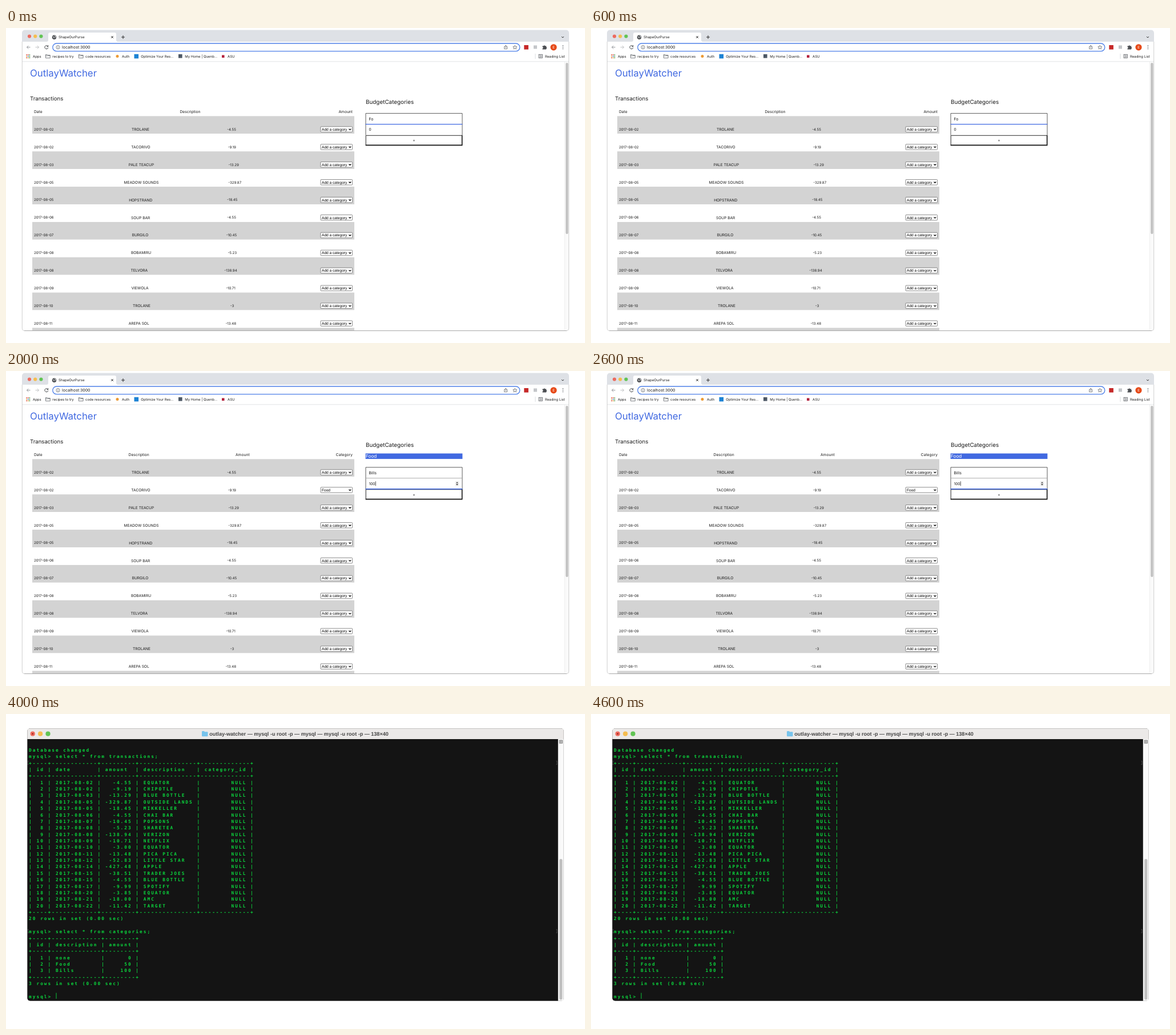
An HTML page that plays this animation: 1014 by 552 pixels, repeating every 5 s.

```html
<!DOCTYPE html>
<html lang="en">
<head>
<meta charset="utf-8">
<title>Budget demo</title>
<style>
  html, body { margin: 0; width: 100%; height: 100%; overflow: hidden; background: #fff; }
  svg { display: block; width: 1014px; height: 552px; text-rendering: geometricPrecision; }
</style>
</head>
<body>
<svg id="stage" viewBox="0 0 1014 552"></svg>
<script>
const BLUE = '#4169e1', INK = '#1c1c1c', GREY = '#5f6368';
const SANS = 'Inter, sans-serif', ARIAL = "'Liberation Sans', Arial, sans-serif";
const MONO = "'DejaVu Sans Mono', monospace";

// Text is placed by the vertical centre of its capitals.
const text = (x, cy, str, size, { fill = INK, anchor = 'start', font = SANS, extra = '' } = {}) =>
  `<text x="${x}" y="${cy + size * 0.36}" font-size="${size}" font-family="${font}" fill="${fill}" text-anchor="${anchor}" ${extra}>${str}</text>`;
const rect = (x, y, w, h, fill, extra = '') =>
  `<rect x="${x}" y="${y}" width="${w}" height="${h}" fill="${fill}" ${extra}/>`;
const circle = (cx, cy, r, fill, extra = '') =>
  `<circle cx="${cx}" cy="${cy}" r="${r}" fill="${fill}" ${extra}/>`;
const line = (d, stroke, width = 1, extra = '') =>
  `<path d="${d}" fill="none" stroke="${stroke}" stroke-width="${width}" ${extra}/>`;
const lights = (x, y, step, r) =>
  ['#ed6a5e', '#f5bd4f', '#61c454'].map((c, i) => circle(x + i * step, y, r, c)).join('');

// date, description, its centre, amount, its centre
const rows = [
  ['2017-08-02', 'TROLANE', 235.5, '-4.55', 395],
  ['2017-08-02', 'TACORIVO', 236, '-9.19', 395.7],
  ['2017-08-03', 'PALE TEACUP', 237, '-13.29', 398.7],
  ['2017-08-05', 'MEADOW SOUNDS', 237, '-329.87', 400.7],
  ['2017-08-05', 'HOPSTRAND', 235.7, '-18.45', 396.3],
  ['2017-08-06', 'SOUP BAR', 235.7, '-4.55', 395],
  ['2017-08-07', 'BURGILO', 235, '-10.45', 395],
  ['2017-08-08', 'BOBAMIRU', 236.5, '-5.23', 396.3],
  ['2017-08-08', 'TELVORA', 233.3, '-138.94', 393.5],
  ['2017-08-09', 'VIEWOLA', 234.5, '-10.71', 393.5],
  ['2017-08-10', 'TROLANE', 237.5, '-3', 396],
  ['2017-08-11', 'AREPA SOL', 232.7, '-13.48', 393.7],
];
const ROW_TOP = 154.4, ROW_H = 30.92;

function chrome() {
  const tabBar = rect(28, 3.5, 958, 30, '#dee1e6', 'rx="5"') + rect(28, 24, 958, 35, '#fff') +
    '<path d="M71 24q3 0 3-3v-10q0-3 3-3h113q3 0 3 3v10q0 3 3 3z" fill="#fff"/>' +
    lights(41, 14.5, 10.2, 3.1) +
    circle(84.5, 16.2, 3.7, '#4a4d51') + line('M82 15l2 1 0 2M85 13.5l2 1.5-1 2', '#fff', 0.9) +
    text(92, 16, 'ShapeOurPurse', 6.1) +
    line('M184.2 14.2l3.6 3.6m0-3.6l-3.6 3.6', INK, 0.9) +
    line('M202 16h6m-3-3v6', INK, 0.9) + line('M973 15l2 2 2-2', INK, 0.9);

  const toolbar =
    line('M42.5 33.7h-6m2.8-2.8l-2.8 2.8 2.8 2.8', '#8b8e92', 0.9) +
    line('M51.5 33.7h6m-2.8-2.8l2.8 2.8-2.8 2.8', '#b9bbbe', 0.9) +
    line('M73.2 31.8a3 3 0 1 0 .6 2.6M73.8 30.3v2.3h-2.3', '#3c4043', 1) +
    rect(81.8, 27, 818, 13.7, '#fff', `rx="6.8" stroke="#4e80e8" stroke-width="1.3"`) +
    circle(91, 33.7, 3.1, 'none', `stroke="${GREY}" stroke-width=".8"`) +
    line('M91 33v2.4M91 31.8v.7', GREY, 0.8) +
    text(98, 33.7, 'localhost:3000', 7) +
    line('M874 32.5h-1.3v4.2h5v-4.2h-1.3M875.2 35v-4.7m-1.5 1.4l1.5-1.5 1.5 1.5', GREY, 0.8) +
    line('M891.3 30.4l1 2.3 2.5.2-1.9 1.6.6 2.5-2.2-1.3-2.2 1.3.6-2.5-1.9-1.6 2.5-.2z', GREY, 0.8) +
    rect(907.3, 30, 7.6, 7.6, '#c62828') + rect(924, 30.5, 6, 6, '#c4c6c9') +
    '<path d="M939.5 31.5h2a1.4 1.4 0 0 1 2.7 0h2v2a1.4 1.4 0 0 1 0 2.7v1.3h-6.7v-1.8a1.2 1.2 0 0 0 0-2.4z" fill="#4a4d51"/>' +
    circle(959, 33.8, 5.6, '#e64a19') + text(959, 33.8, 'E', 6, { fill: '#fff', anchor: 'middle' }) +
    [30.9, 33.7, 36.5].map(y => circle(975.4, y, 0.8, GREY)).join('');

  const folder = x => line(`M${x} 46.5h2.8l1 1.1h4v5h-7.8zM${x} 48.7h7.8`, GREY, 0.8);
  const gridColors = ['#e15241', '#e15241', '#5aa55a', '#e8a33d', '#4b7de0', '#5aa55a', '#e15241', '#e8a33d', '#5aa55a'];
  const bookmarks =
    gridColors.map((c, i) => rect(35.3 + i % 3 * 2.6, 46.2 + Math.floor(i / 3) * 2.6, 1.7, 1.7, c)).join('') +
    folder(69.5) + folder(127.3) +
    circle(195, 49.5, 2.5, '#eb9a35') + rect(224.5, 45.8, 7.6, 7.6, '#1d83d4') +
    rect(302, 46, 6.6, 6.6, '#4d5866') + rect(378, 47.5, 4.5, 4.5, '#b3213c') +
    [[47, 'Apps'], [81.3, 'recipes to try'], [139, 'code resources'], [203, 'Auth'],
     [236.3, 'Optimize Your Res...'], [313.3, 'My Home | Quenb...'], [388, 'ASU'], [944, 'Reading List']]
      .map(([x, label]) => text(x, 49.5, label, 6)).join('') +
    line('M927 45v9', '#d0d3d7', 0.8) +
    rect(933, 46.3, 6.4, 6.2, 'none', `stroke="${GREY}" stroke-width=".8"`) +
    line('M935 46.3v6.2M936 48h2.4m-2.4 1.5h2.4m-2.4 1.5h2.4', GREY, 0.7) +
    line('M28 58.8H986', '#dfe1e4', 0.9);

  const frame = rect(978.5, 59.3, 7.5, 470, '#fafafa') + line('M978.5 59.3V530', '#e9e9e9', 0.7) +
    rect(980.3, 61, 4.2, 300, '#c1c1c1', 'rx="2.1"') +
    line('M28.3 24V526q0 4.5 4.5 4.5H981.2q4.5 0 4.5-4.5V24', '#c4c4c4', 0.8) +
    line('M32 530.5H982', '#a5a5a5', 0.9);
  return tabBar + toolbar + bookmarks + frame;
}

const select = (cy, value) =>
  rect(551, cy - 4.8, 55.6, 9.5, '#fff', 'rx="1" stroke="#707070" stroke-width=".8"') +
  text(553, cy, value, 6.6, { font: ARIAL, fill: '#000' }) +
  line(`M600.5 ${cy - 0.9}l1.9 1.9 1.9-1.9`, '#000', 1.2);

function table({ wideHeader, hover, assigned }) {
  const header = (x, label, anchor) => text(x, 147, label, 6.7, { anchor });
  const head = header(49, 'Date') + (wideHeader
    ? header(322.5, 'Description', 'middle') + header(607, 'Amount', 'end')
    : header(232.7, 'Description', 'middle') + header(414.3, 'Amount', 'middle') + header(607, 'Category', 'end'));
  const body = rows.map(([date, name, nameX, amount, amountX], i) => {
    const top = ROW_TOP + i * ROW_H, cy = top + 23.2, fill = i === hover ? BLUE : INK;
    const band = i === hover ? '#edf0fb' : i % 2 ? '#fff' : '#d3d3d3';
    return rect(46, top, 564, ROW_H, band) + text(49, cy, date, 6.15, { fill }) +
      text(nameX, cy, name, 6.6, { fill, anchor: 'middle' }) +
      text(amountX, cy, amount, 6.15, { fill, anchor: 'middle' }) +
      select(cy, assigned && i === 1 ? 'Food' : 'Add a category');
  }).join('');
  return head + body + rect(46, ROW_TOP + 12 * ROW_H, 564, 4.6, '#d3d3d3');
}

function categoryPanel({ categories, name, amount, focus }) {
  const top = categories.length ? 159.2 + categories.length * 9.6 : 149.6;
  const list = categories.length
    ? rect(629.6, 144.5, 169.8, categories.length * 9.6, BLUE) +
      categories.map((c, i) => text(630, 149.2 + i * 9.6, c, 8.2, { fill: '#fff' })).join('')
    : '';
  const edge = (y, on) => line(`M629.6 ${y}H799.4`, on ? BLUE : '#a3a3a3', on ? 1.4 : 0.9);
  const inputs =
    line(`M630 ${top + 38}V${top}H799V${top + 38}`, '#4a4a4a', 0.9) +
    edge(top + 19, focus === 'name') +
    text(635.5, top + 9.5, name || 'Budget Category', 7, { fill: name ? INK : '#757575' }) +
    text(635.5, top + 28.5, amount, 6.6);
  const spinner = focus === 'amount'
    ? line(`M647.3 ${top + 24.5}v8`, '#000', 0.7) +
      rect(786.5, top + 24, 7, 9, '#efefef') +
      `<path d="M788 ${top + 27.8}l2-2.4 2 2.4zM788 ${top + 29.2}l2 2.4 2-2.4z" fill="#444"/>`
    : '';
  const button =
    line(`M630.3 ${top + 56.5}V${top + 38.8}H799`, '#555', 1.3) +
    line(`M629.8 ${top + 55.8}H798.7V${top + 38.2}`, '#111', 1.6) +
    text(714.5, top + 47.4, '+', 6.6, { anchor: 'middle' });
  return text(630, 129, 'BudgetCategories', 9.9) + list + inputs + button + spinner +
    (focus === 'amount' ? edge(top + 38, true) : '');
}

const browser = state =>
  text(42, 79, 'OutlayWatcher', 16.8, { fill: BLUE }) + text(42, 124, 'Transactions', 9.6) +
  table(state) + categoryPanel(state) + chrome();

const ledger = `02 -4.55 EQUATOR|02 -9.19 CHIPOTLE|03 -13.29 BLUE BOTTLE|05 -329.87 OUTSIDE LANDS|05 -18.45 MIKKELLER
06 -4.55 CHAI BAR|07 -10.45 POPSONS|08 -5.23 SHARETEA|08 -138.94 VERIZON|09 -10.71 NETFLIX
10 -3.00 EQUATOR|11 -13.48 PICA PICA|12 -52.83 LITTLE STAR|14 -427.48 APPLE|15 -38.51 TRADER JOES
15 -4.55 BLUE BOTTLE|17 -9.99 SPOTIFY|20 -3.85 EQUATOR|21 -18.00 AMC|22 -11.42 TARGET`
  .split(/[|\n]/).map((entry, i) => {
    const [day, amount, ...name] = entry.split(' ');
    return [i + 1, '2017-08-' + day, amount, name.join(' '), 'NULL'];
  });

// Negative widths mean right-aligned columns.
function asciiTable(names, widths, records) {
  const rule = '+' + widths.map(w => '-'.repeat(Math.abs(w) + 2)).join('+') + '+';
  const row = (cells, align) => '| ' + cells.map((c, i) =>
    align && widths[i] < 0 ? String(c).padStart(-widths[i]) : String(c).padEnd(Math.abs(widths[i]))).join(' | ') + ' |';
  return [rule, row(names), rule, ...records.map(r => row(r, true)), rule];
}

function terminal() {
  const lines = [
    'Database changed', 'mysql> select * from transactions;',
    ...asciiTable(['id', 'date', 'amount', 'description', 'category_id'], [-2, 10, -7, 13, -11], ledger),
    '20 rows in set (0.00 sec)', '', 'mysql> select * from categories;',
    ...asciiTable(['id', 'description', 'amount'], [-2, 11, -6], [[1, 'none', 0], [2, 'Food', 50], [3, 'Bills', 100]]),
    '3 rows in set (0.00 sec)', '', 'mysql>',
  ];
  const size = 7.8, pitch = 6.69, lineH = 11.37;
  const extra = `font-weight="bold" letter-spacing="${pitch - 0.602 * size}" xml:space="preserve"`;
  const output = lines.map((s, i) =>
    text(40.1, 63 + i * lineH, s.replace('>', '&gt;'), size, { font: MONO, fill: '#0bd63d', extra })).join('');
  const marks = [85.5, 380.5].map(y =>
    line(`M39.5 ${y - 3}h-1.5v6h1.5M963.5 ${y - 3}h1.5v6h-1.5`, '#666', 0.6)).join('');
  return rect(37.3, 25.3, 939.5, 477.5, '#141414', 'rx="5"') +
    '<path d="M37.3 44V30.3q0-5 5-5H971.8q5 0 5 5V44z" fill="#ebe9e8"/>' +
    lights(46.7, 34.7, 13.4, 4.1) + circle(46.7, 34.7, 1.2, '#8c1a10') +
    '<path d="M343 31q0-1 1-1h3l1 1.2h4.5q1 0 1 1v6q0 1-1 1h-8.5q-1 0-1-1z" fill="#76c3ec"/>' +
    text(356.3, 34.5, 'outlay-watcher — mysql -u root -p — mysql — mysql -u root -p — 138×40', 9.05,
      { font: ARIAL, fill: '#454545', extra: 'font-weight="bold"' }) +
    '<path d="M966.8 44h10V498q0 4.8-5 4.8h-5z" fill="#fafafa"/>' +
    rect(969.2, 46, 5.2, 5.2, '#ddd', 'stroke="#555" stroke-width=".7"') +
    line('M970.2 47.7h3.2m-3.2 1.7h3.2', '#555', 0.6) +
    rect(969.2, 254, 5.2, 246.5, '#c0c0c0', 'rx="2.6"') +
    output + marks + line('M88 488.7v10.3', '#0bd63d', 0.9);
}

const scenes = [
  browser({ wideHeader: true, categories: [], name: 'Fo', amount: '0', focus: 'name' }),
  browser({ hover: 1, categories: ['Food'], amount: '0' }),
  browser({ assigned: true, categories: ['Food'], name: 'Bills', amount: '100', focus: 'amount' }),
  browser({ hover: 4, assigned: true, categories: ['Food', 'Bills'], amount: '0' }),
  terminal(),
];

const stage = document.getElementById('stage');
let shown = -1;
function draw() {
  const current = Math.floor(performance.now() / 1000) % scenes.length;
  if (current !== shown) stage.innerHTML = scenes[shown = current];
  requestAnimationFrame(draw);
}
draw();
</script>
</body>
</html>
```
